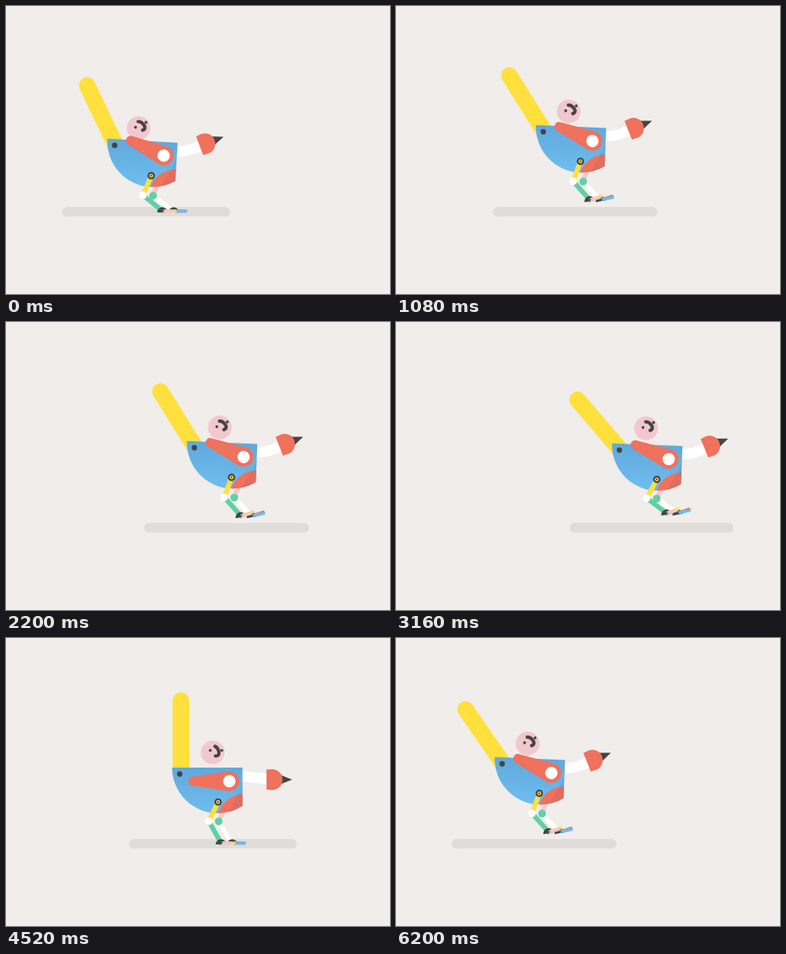
An HTML page with a canvas for the animation above (6240 ms loop, 480x360 px).

```html
<!DOCTYPE html>
<html>
<head>
<meta charset="utf-8">
<style>
html, body { margin: 0; width: 100%; height: 100%; overflow: hidden; background: #f0edea; }
canvas { display: block; }
</style>
</head>
<body>
<canvas id="stage" width="480" height="360"></canvas>
<script>
const g = document.getElementById('stage').getContext('2d');
const LOOP = 6240, HOP = 560, STEP = 25.7;
const YELLOW = '#ffe03c', RED = '#f0715c', GREEN = '#60d0a6', PINK = '#f2c8cf',
      DARK = '#454545', BLUE = '#6cbcf0', WHITE = '#fff';
const rad = a => a * Math.PI / 180;

// Hop: ms, advance, hip y, lean, tail angle, tail length, foot x, lift, head y
const hopRows = [
  [0, 0, 212, 3.5, 25.5, 83, 20.5, 0, -15.5],
  [80, 1, 218, 5, 51, 86, 19.5, 0, -14],
  [160, 1, 221, 6, 76, 89, 19.5, 0, -13],
  [240, 4, 219, 5, 88, 92, 16.5, 0, -14],
  [320, 7, 206, 2, 80, 90, 13.5, 0, -18],
  [360, 16, 197, 2, 40.5, 83, 18.5, 17, -20.5],
  [440, 20, 188, 2, 42, 83, 20, 25, -20],
  [520, 23.3, 194, 2.3, 32, 83, 18, 14, -18.6]
];
// Slide: ms, hip y, lean, tail angle, foot x, head y, head shift, head tilt, wing angle, hand raise
const slideRows = [
  [3520, 220, 5, 87, 19.5, -13, 0, 25, 21, 1],
  [3650, 214, 3, 70, 14, -12, 2, 25, 14, 1],
  [3760, 206, 0, 22, 10, -11, 6, 25, 4, .7],
  [3880, 205, 0, 0, 10, -13, 7, 25, 0, .35],
  [3920, 205, 0, 0, 10, -14, 7.5, 24, 0, .28],
  [4200, 205, 0, 0, 10, -19, 10, 6, 0, 0],
  [4400, 205, 0, 0, 10, -19, 10, 0, 0, 0],
  [5580, 205, 0, 0, 10, -19, 10, 0, 0, 0],
  [5690, 209, 2, 14, 17, -16, 4, 14, 12, .6]
];
const slideX = t => t < 3650 ? 330 : 340 - .0934 * (t - 3650);

const keys = [];
function addHop(n, start, from = 0, to = 8) {
  for (const [t, x, ...pose] of hopRows.slice(from, to))
    keys.push([start + t, 175 + n * STEP + x, ...pose, 0, 25, 21, 1]);
}
for (let n = -1; n < 6; n++) addHop(n, n * HOP);
addHop(6, 6 * HOP, 0, 2);
for (const [t, hip, lean, tail, foot, ...rest] of slideRows)
  keys.push([t, slideX(t), hip, lean, tail, 92, foot, 0, ...rest]);
addHop(-1, LOOP - HOP, 1);
keys[keys.length - 1][4] = 34.8;
addHop(0, LOOP);

// Monotone cubic through the keys; the ground position is linear
function pose(t) {
  let i = 1;
  while (keys[i + 1][0] <= t) i++;
  const [p, a, b, q] = [-1, 0, 1, 2].map(d => keys[i + d]);
  const h = b[0] - a[0], u = (t - a[0]) / h;
  return a.map((v, c) => {
    const slope = (k, l) => (l[c] - k[c]) / (l[0] - k[0]);
    const mean = (m, n) => m * n > 0 ? 2 * m * n / (m + n) : 0;
    const s = slope(a, b);
    if (c < 2) return v + s * h * u;
    const m = mean(slope(p, a), s) * h, n = mean(s, slope(b, q)) * h, d = b[c] - v;
    return v + u * (m + u * (3 * d - 2 * m - n + u * (m + n - 2 * d)));
  });
}

function disc(x, y, r, color) {
  g.fillStyle = color;
  g.beginPath();
  g.arc(x, y, r, 0, 7);
  g.fill();
}
function line(x1, y1, x2, y2, width, color, cap = 'round') {
  g.lineCap = cap;
  g.lineWidth = width;
  g.strokeStyle = color;
  g.beginPath();
  g.moveTo(x1, y1);
  g.lineTo(x2, y2);
  g.stroke();
}
function at(x, y, angle, draw) {
  g.save();
  g.translate(x, y);
  g.rotate(rad(angle));
  draw();
  g.restore();
}

function leg(hx, hy, ax, ay, thigh, shin, knee) {
  const A = 26.6, B = 31, dx = ax - hx, dy = ay - hy;
  const d = Math.min(Math.hypot(dx, dy), A + B - .1);
  const bend = Math.atan2(dy, dx) + Math.acos((A * A + d * d - B * B) / (2 * A * d));
  const kx = hx + A * Math.cos(bend), ky = hy + A * Math.sin(bend);
  line(hx, hy, kx, ky, 6, thigh);
  line(kx, ky, ax, ay, 6, shin);
  disc(kx, ky, 4.8, knee);
}
function foot(x, y, toe, toes) {
  at(x, y, -toe, () => {
    g.fillStyle = DARK;
    g.beginPath();
    g.arc(0, 0, 6.5, Math.PI, 0);
    g.fill();
    toes.forEach(([len, color, spread]) =>
      at(0, -1.7, -toe * spread, () => line(2, 0, len, 0, 3.8, color)));
    disc(1, -1.8, 1.1, DARK);
  });
}

function drawHead(x, y, tilt) {
  at(x, y, -tilt, () => {
    disc(0, 0, 14.8, PINK);
    disc(-3, -2.5, 1.8, DARK);
    disc(11.5, -2.5, 1.8, DARK);
    g.lineCap = 'round';
    g.lineWidth = 4.2;
    g.strokeStyle = DARK;
    g.beginPath();
    g.moveTo(3, -7.5);
    g.bezierCurveTo(7.5, -5.5, 11, 5, 3.5, 4.5);
    g.stroke();
  });
}

function drawArm(raise) {
  const x = 125 - 3 * raise, y = 15 - 16 * raise, turn = rad(24 * raise);
  g.lineCap = 'butt';
  g.lineWidth = 13;
  g.strokeStyle = WHITE;
  g.beginPath();
  g.moveTo(80, 11);
  g.quadraticCurveTo(103, 11, x - 4 * Math.cos(turn), y + 4 * Math.sin(turn));
  g.stroke();
  at(x, y, -24 * raise, () => {
    g.fillStyle = DARK;
    g.beginPath();
    g.moveTo(10, -6);
    g.lineTo(25, 0);
    g.lineTo(10, 6);
    g.fill();
    g.fillStyle = RED;
    g.beginPath();
    g.moveTo(-7, -12.5);
    g.lineTo(0, -13);
    g.arc(0, 0, 13, -Math.PI / 2, Math.PI / 2);
    g.lineTo(-7, 12.5);
    g.fill();
  });
}

function drawTorso() {
  g.save();
  g.beginPath();
  g.moveTo(0, 0);
  g.arc(57, 0, 57, Math.PI, Math.acos(31 / 57), true);
  g.lineTo(88, 0);
  g.closePath();
  const blue = g.createLinearGradient(0, 0, 0, 57);
  blue.addColorStop(0, '#60a9dc');
  blue.addColorStop(1, '#6fbdef');
  g.fillStyle = blue;
  g.fill();
  g.clip();
  disc(90, 67, 34, RED);
  g.fillStyle = 'rgba(70,70,110,.09)';
  g.beginPath();
  g.moveTo(88, 22);
  g.lineTo(70, 57);
  g.lineTo(88, 57);
  g.fill();
  g.restore();
  disc(9.5, 8, 3.4, DARK);
}

function drawWing(angle) {
  at(71.5, 17, angle, () => {
    g.fillStyle = RED;
    g.beginPath();
    g.arc(0, 0, 12.3, -1.72, 1.72);
    g.arc(-45.5, 0, 5.8, 1.72, -1.72);
    g.fill();
    disc(0, 0, 7.7, WHITE);
  });
}

function draw(t) {
  const [, x, hip, lean, tail, len, fx, lift, hy, shift, tilt, wing, raise] = pose(t);
  const hipX = x + 6.5, ax = x + fx, ground = 258 - lift, toe = Math.min(lift, 15) * .7;
  const inBody = fn => at(hipX, hip, lean, () => {
    g.translate(-57.5, -43);
    fn();
  });

  g.fillStyle = '#f0edea';
  g.fillRect(0, 0, 480, 360);
  const half = 105 - .15 * lift;
  line(x - half + 6, 257.3, x + half - 6, 257.3, 12, '#e0dcd9');

  inBody(() => at(11, 8, -tail - lean, () => line(0, 0, 0, -len, 20.6, YELLOW)));
  leg(hipX + 11.5, hip, ax + 13, ground - 2, PINK, WHITE, GREEN);
  inBody(() => {
    drawArm(raise);
    drawHead(26.5 - .745 * hy + shift, hy, tilt + lean);
    drawTorso();
    drawWing(wing);
  });
  leg(hipX, hip, ax, ground - 2, YELLOW, GREEN, WHITE);
  disc(hipX, hip, 4.6, DARK);
  disc(hipX, hip, 2.4, YELLOW);
  disc(hipX, hip, 1.1, DARK);
  foot(ax + 14, ground, toe, [[15, RED, .9], [15.5, BLUE, .3]]);
  foot(ax, ground, toe, [[16, YELLOW, .9], [13, PINK, .5]]);
}

const start = performance.now();
function tick() {
  draw((performance.now() - start) % LOOP);
  requestAnimationFrame(tick);
}
tick();
</script>
</body>
</html>
```
